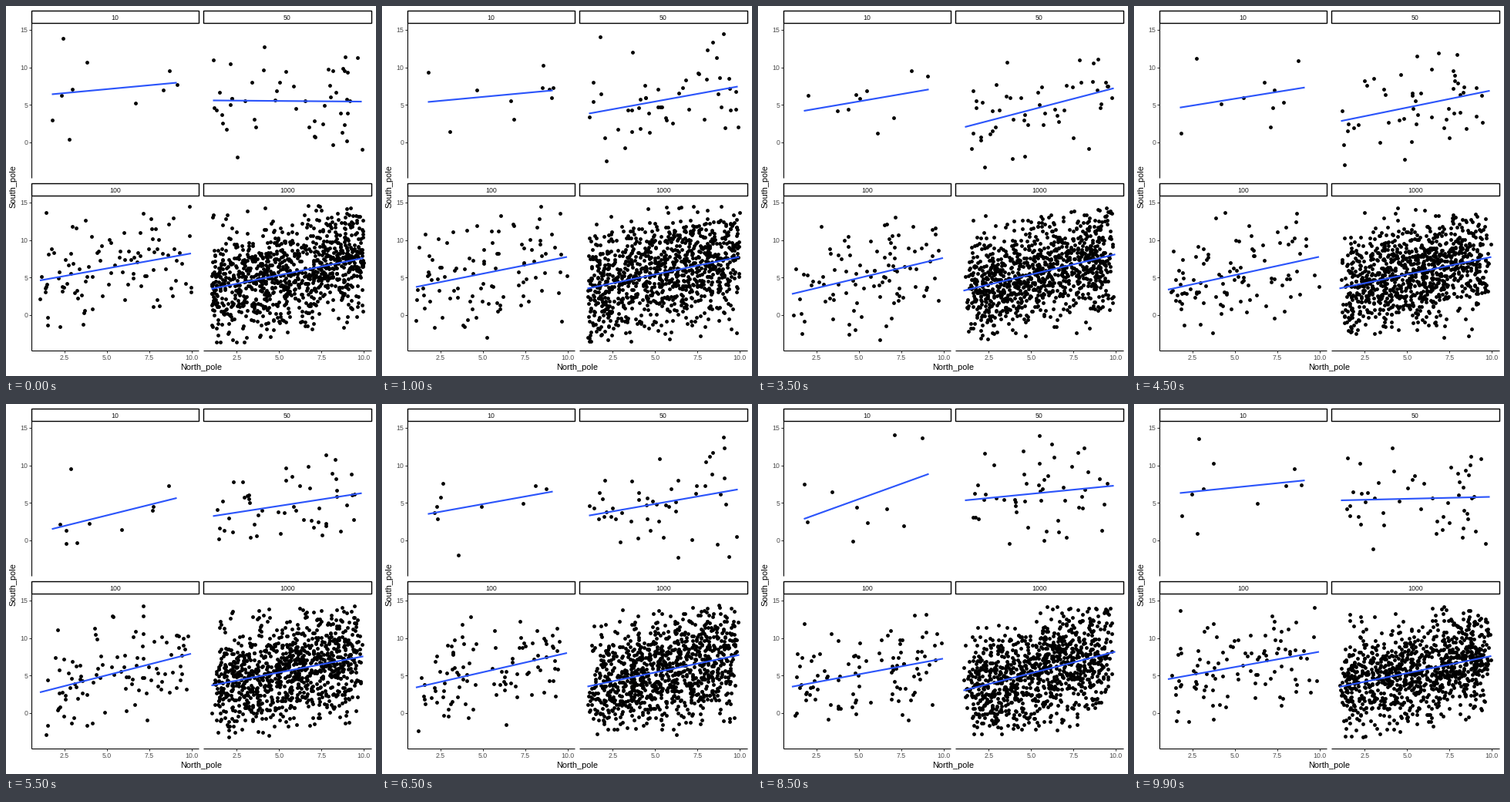
Animation of 480x480 px, one loop 10000 ms. Source, as a matplotlib script:

```python
import matplotlib.pyplot as plt
import numpy as np
from matplotlib.animation import FuncAnimation
from matplotlib.patches import Rectangle

SIZE, FRAMES, STEP = 480, 100, 100
STATES = 10
BLUE, GREY, DARK = "#2c55fb", "#4d4d4d", "#333333"
LEFT, RIGHT = (33.5, 250.5), (256.8, 474)
ROW_GAP = 224
NOISE = 36

# Panel: sample size, row, x span, then line height at each end per state
PANELS = [
    (10, 0, (60, 222),
     [115, 125, 125, 137, 130, 164, 145, 118, 151, 130],
     [100, 110, 147, 109, 105, 123, 115, 101, 91, 94]),
    (50, 0, (269, 462),
     [123, 140, 167, 158, 150, 146, 145, 148, 123, 160],
     [124.5, 105, 92, 107, 110, 116.5, 112, 102, 109, 72]),
    (100, 1, (44.5, 240.5),
     [356.5, 365, 359, 374.5, 368, 375, 368, 372, 367, 371],
     [321.5, 326, 325, 327.5, 326, 324.5, 324, 316.5, 331, 329]),
    (1000, 1, (267, 464),
     [367.5, 367, 366, 370, 367, 365.5, 367, 367.5, 372.5, 367],
     [327.5, 326, 326, 322.5, 326, 328, 326, 326, 321.5, 327]),
]

rng = np.random.default_rng(12)
plt.rcParams["font.family"] = "Liberation Sans"


def cloud(line, count, row):
    """Random points whose least-squares fit is the given line."""
    x0, y0, x1, y1 = line
    low, high = 35 + row * ROW_GAP, 212.5 + row * ROW_GAP
    u = rng.uniform(size=count)
    u = (u - u.min()) / (u.max() - u.min())
    trend = y0 + (y1 - y0) * u
    y = trend + rng.normal(0, NOISE, count)
    while (out := (y < low) | (y > high)).any():
        y[out] = trend[out] + rng.normal(0, NOISE, out.sum())
    y += trend - np.polyval(np.polyfit(u, y, 1), u)
    return np.column_stack([x0 + (x1 - x0) * u, y.clip(low, high)])


def pose(keys, frame):
    """Rest in a state, then ease in and out to the next one."""
    i, k = divmod(frame, STATES)
    leave = 3 if i == 0 else 4
    t = max(0, (k - leave) / (10 - leave))
    t = (1 - np.cos(np.pi * t)) / 2
    return keys[i] * (1 - t) + keys[(i + 1) % STATES] * t


fits, clouds = [], []
for count, row, (x0, x1), starts, ends in PANELS:
    lines = [np.array([x0, a, x1, b]) for a, b in zip(starts, ends)]
    fits.append(lines)
    clouds.append([cloud(line, count, row) for line in lines])
dots = [np.vstack(state) for state in zip(*clouds)]

# At 72 dpi one point is one pixel; the half-pixel offset keeps rules sharp
fig = plt.figure(figsize=(SIZE / 72, SIZE / 72), dpi=72, facecolor="white")
ax = fig.add_axes([0, 0, 1, 1])
ax.set(xlim=(0.5, SIZE + 0.5), ylim=(SIZE + 0.5, 0.5))
ax.axis("off")


def rule(xs, ys, color="black"):
    ax.plot(xs, ys, color=color, lw=1.07, solid_capstyle="butt")


def label(x, y, text, size=8.8, color=GREY, **kw):
    kw = {"ha": "center", "va": "baseline", **kw}
    ax.text(x, y, text, size=size, color=color, **kw)


for row, names in enumerate((("10", "50"), ("100", "1000"))):
    dy = row * ROW_GAP
    for (a, b), name in zip((LEFT, RIGHT), names):
        ax.add_patch(Rectangle((a, 6.3 + dy), b - a, 16,
                               fc="white", ec="black", lw=1.4))
        label((a + b) / 2, 18.3 + dy, name, color="#1a1a1a")
    rule((33.5, 33.5), (22.5 + dy, 223.5 + dy))
    for value in (0, 5, 10, 15):
        y = 177.3 - 9.7 * value + dy
        rule((30.8, 33.5), (y, y), DARK)
        label(28.6, y + 3.2, str(value), ha="right")

for (a, b), shift in ((LEFT, 21.3), (RIGHT, 244.8)):
    rule((a, b), (447.5, 447.5))
    for value in (2.5, 5, 7.5, 10):
        x = shift + 22 * value
        rule((x, x), (447.5, 450.2), DARK)
        label(x, 459.3, f"{value:.1f}")

label(254, 472.3, "North_pole", 11, "black")
label(13.3, 235, "South_pole", 11, "black", rotation=90,
      rotation_mode="anchor")

scatter = ax.scatter(*dots[0].T, s=4.85 ** 2, c="black", lw=0, zorder=3)
trends = [ax.plot([], [], color=BLUE, lw=2.13, solid_capstyle="butt",
                  zorder=4)[0] for _ in fits]


def draw(frame):
    scatter.set_offsets(pose(dots, frame))
    for trend, keys in zip(trends, fits):
        x0, y0, x1, y1 = pose(keys, frame)
        trend.set_data((x0, x1), (y0, y1))
    return [scatter, *trends]


anim = FuncAnimation(fig, draw, frames=FRAMES, interval=STEP, repeat=True,
                     repeat_delay=0, init_func=lambda: draw(0))
plt.show()
```
